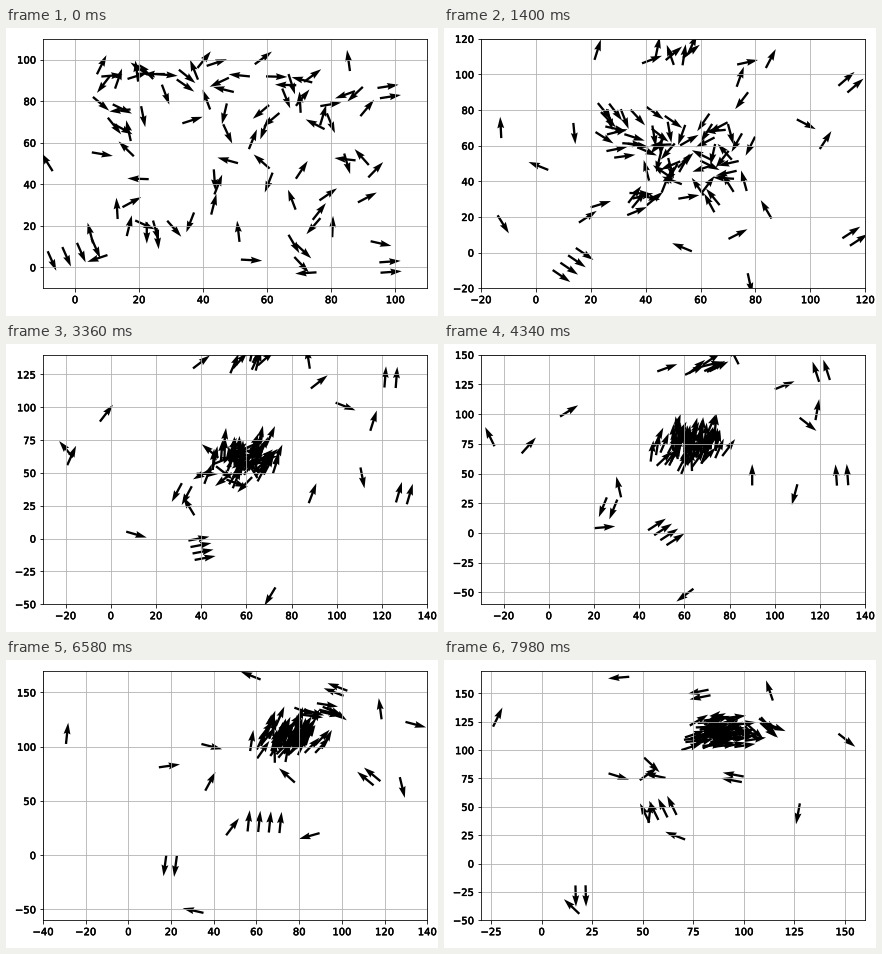
A matplotlib script that plays this animation: 432 by 288 pixels, repeating every 8 s.

```python
import numpy as np
import matplotlib.pyplot as plt
from matplotlib import patheffects
from matplotlib.animation import FuncAnimation

LOOP, TICK, HOLD = 8000, 40, 140      # ms: loop, redraw, time per simulation step
STEPS = LOOP // HOLD + 1
MID, LAST = 31, STEPS - 1
SPEED = 1.9
MAIN, TOP = 70, 7                     # birds in the two flocks

# Lone birds fly arcs: x, y, heading and turn per step (degrees) at MID, birds side by side.
ARCS = np.array([
    (-24, 73, 116, -2.0, 1), (-12, 67, 48, -2.5, 1), (5, 98, 32, -2.9, 1),
    (20, 4, 5, 3.0, 1), (48, -4, 33, 3.2, 4), (28, 29, 248, 0.9, 2),
    (32, 30, 103, -2.6, 1), (64, -47, -143, -3.1, 1), (130, 40, 94, 2.9, 2),
    (110, 41, -105, -3.7, 1), (90, 40, 90, 3.0, 1), (100, 121, 22, -2.3, 1),
    (111, 97, -38, -2.4, 1), (118, 95, 80, 1.1, 1), (122, 128, 108, 3.2, 2),
    (84, 142, 117, 2.6, 1), (48, 136, 20, -2.5, 1),
])


def polar(angle):
    return np.stack([np.cos(angle), np.sin(angle)], axis=-1)


def fly_scouts(step):
    x, y, heading, turn, count = ARCS.T
    heading, turn = np.radians(heading), np.radians(turn)
    aim = heading + turn * (step - MID)
    chord = 2 * SPEED * np.sin((aim - heading) / 2) / turn
    pos = np.stack([x, y], axis=-1) + chord[:, None] * polar((aim + heading) / 2)
    who = np.repeat(np.arange(len(ARCS)), count.astype(int))
    rank = np.arange(len(who)) - np.searchsorted(who, who)
    abreast = 5 * (rank - (count[who] - 1) / 2)
    return pos[who] + abreast[:, None] * polar(aim[who] + np.pi / 2), aim[who]


def leaders(step):
    """Centres of the main flock and of the small one above it."""
    s = step / LAST
    return np.array([
        (53 + 31 * s ** 2, 78 - 31 * np.cos(np.pi * (step - 10) / 47)),
        (50 + 57 * s ** 2, 92 + 43 * np.sin(np.pi * step / 75)),
    ])


def fly_flock():
    """Birds steer, some sooner than others, to a wandering slot near their leader."""
    rng = np.random.default_rng(12)
    total = MAIN + TOP
    group = np.repeat([0, 1], [MAIN, TOP])
    pos = np.vstack([rng.uniform((5, 5), (97, 98), (MAIN, 2)),
                     rng.uniform((20, 88), (65, 97), (TOP, 2))])
    slot = rng.normal(size=(total, 2)) * np.where(group, 0.6, 1)[:, None] * (6, 8)
    phase = rng.uniform(0, 2 * np.pi, total)
    eager = rng.uniform(0.1, 0.3, (total, 1))
    vel = SPEED * polar(rng.uniform(0, 2 * np.pi, total))
    for step in range(STEPS):
        yield pos.copy(), np.arctan2(vel[:, 1], vel[:, 0]) + 0.35 * np.sin(0.3 * step + phase)
        here, ahead = leaders(step), leaders(step + 1)
        goal = here[group] + slot + 2 * polar(0.25 * step + phase)
        wish = (ahead - here)[group] + 0.15 * (goal - pos)
        speed = np.hypot(*wish.T)[:, None]
        wish *= np.minimum(1, 2.7 / np.maximum(speed, 1e-9))
        vel += eager * (wish - vel)
        pos += vel


def edge(step, *values):
    """Axis limit that grows with the swarm in whole tens."""
    return 10 * np.round(np.interp(step, (0, 5, 16, 24, 31, 47, LAST), values) / 10)


def view(step):
    return ((edge(step, -10, -20, -30, -30, -30, -40, -30),
             edge(step, 110, 110, 130, 140, 140, 140, 160)),
            (edge(step, -10, -10, -30, -50, -60, -60, -50),
             edge(step, 110, 110, 130, 140, 150, 170, 170)))


poses = []
for step, (pos, heading) in enumerate(fly_flock()):
    scouts, aim = fly_scouts(step)
    poses.append((np.vstack([scouts, pos]), polar(np.r_[aim, heading])))

plt.rcParams.update({"font.family": "DejaVu Sans", "font.size": 10})
fig, ax = plt.subplots(figsize=(6, 4), dpi=72)
fig.subplots_adjust(left=36.95 / 432, right=421.2 / 432,
                    bottom=27.8 / 288, top=277.2 / 288)
ax.grid(True)
xy, uv = poses[0]
birds = ax.quiver(*xy.T, *uv.T, scale=18, width=0.006, color="black")
crisp = [patheffects.withStroke(linewidth=0.5, foreground="black")]


def update(frame):
    step = (frame * TICK + TICK // 2) // HOLD
    xy, uv = poses[step]
    birds.set_offsets(xy)
    birds.set_UVC(*uv.T)
    xlim, ylim = view(step)
    ax.set_xlim(xlim)
    ax.set_ylim(ylim)
    plt.setp(ax.get_xticklabels() + ax.get_yticklabels(), path_effects=crisp)
    return [birds]


anim = FuncAnimation(fig, update, frames=LOOP // TICK, interval=TICK,
                     init_func=lambda: update(0), repeat=True, repeat_delay=0)
plt.show()
```
